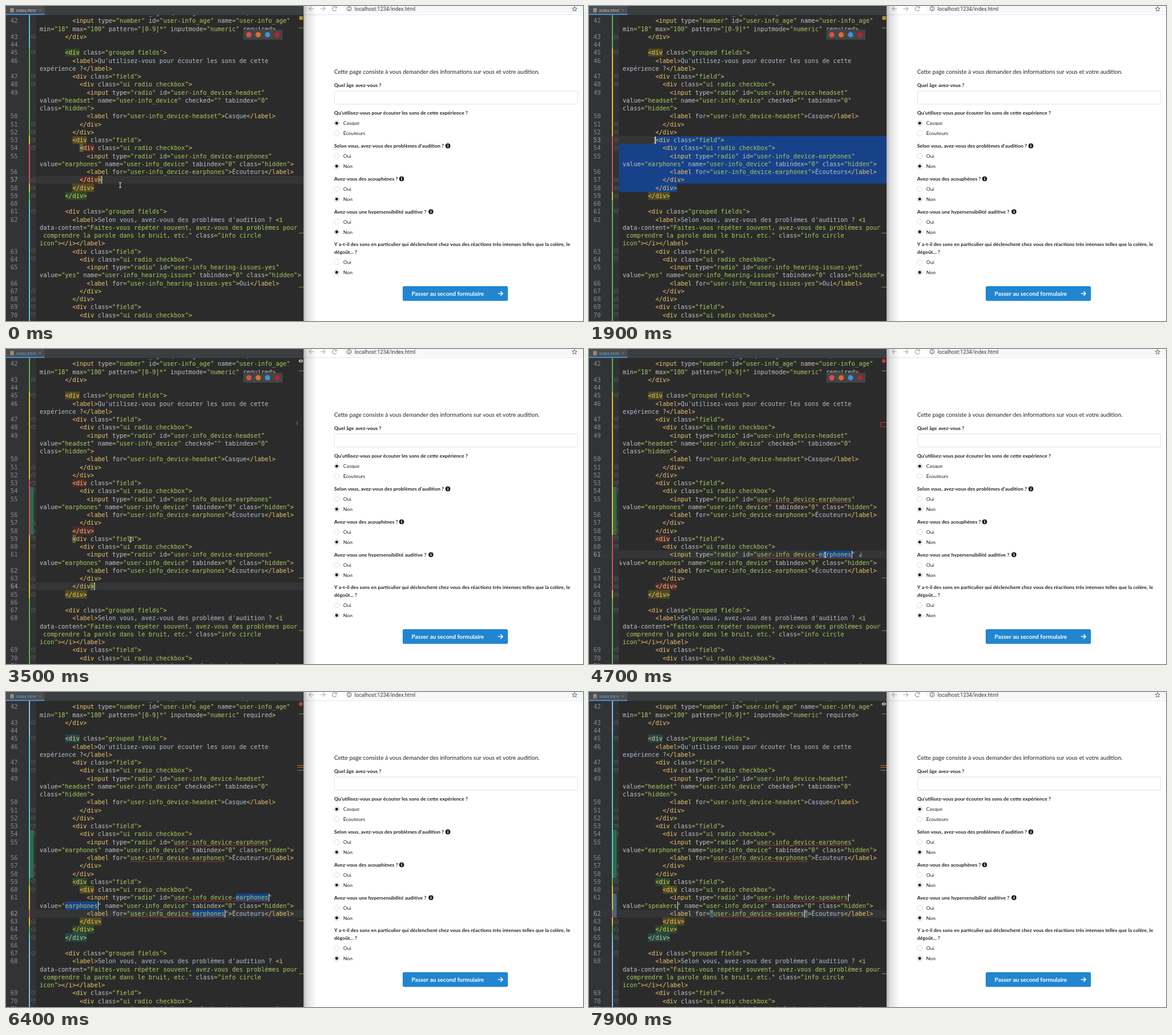
An HTML page with a canvas that plays this animation: 960 px wide and 525 px high, repeating every 8000 ms.

```html
<!DOCTYPE html>
<html lang="fr">
<head>
<meta charset="utf-8">
<title>index.html</title>
<style>
html, body { margin: 0; width: 100%; height: 100%; overflow: hidden; background: #fff; }
canvas { display: block; }
</style>
</head>
<body>
<canvas id="stage" width="960" height="525"></canvas>
<script>
const ctx = document.getElementById('stage').getContext('2d');
const LOOP = 8000;
const CW = 6.04, RH = 13.25, X0 = 50, Y0 = 24.8, EDGE = 495;
const MONO = '10.03px "DejaVu Sans Mono", monospace';
const GOLD = '#efc56c', GREEN = '#abca5f', GREY = '#c2c2c2', PLAIN = '#b0bece';
const BAR = { cyan: '#52c4c4', green: '#55b545', yellow: '#d8bc38', red: '#d0505c', blue: '#86bbea' };
const TINT = { cyan: '#214a4b', green: '#2c4a26', yellow: '#504a20', red: '#502a2c' };

// moments of the session
const T = { press: 600, reached: 1700, release: 2000, dup: 3000, pick: 4400, second: 5200, third: 5600, type: 6700, key: 130 };

// source lines: indent|text, "\n" marks a soft wrap
const radio = w => [
  '10|<div class="field">',
  '12|<div class="ui radio checkbox">',
  `14|<input type="radio" id="user-info_device-${w}"\nvalue="${w}" name="user-info_device" tabindex="0" class="hidden">`,
  `14|<label for="user-info_device-${w}">Écouteurs</label>`,
  '12|</div>',
  '10|</div>'
];
const HEAD = [
  '10|<input type="number" id="user-info_age" name="user-info_age"\nmin="18" max="100" pattern="[0-9]*" inputmode="numeric" required>',
  '8|</div>',
  '0|',
  '8|<div class="grouped fields">',
  '10|<label>Qu\'utilisez-vous pour écouter les sons de cette\nexpérience ?</label>',
  '10|<div class="field">',
  '12|<div class="ui radio checkbox">',
  '14|<input type="radio" id="user-info_device-headset"\nvalue="headset" name="user-info_device" checked="" tabindex="0"\nclass="hidden">',
  '14|<label for="user-info_device-headset">Casque</label>',
  '12|</div>',
  '10|</div>'
];
const TAIL = [
  '8|</div>',
  '0|',
  '8|<div class="grouped fields">',
  '10|<label>Selon vous, avez-vous des problèmes d\'audition ? <i\ndata-content="Faites-vous répéter souvent, avez-vous des problèmes pour\n comprendre la parole dans le bruit, etc." class="info circle\nicon"></i></label>',
  '10|<div class="field">',
  '12|<div class="ui radio checkbox">',
  '14|<input type="radio" id="user-info_hearing-issues-yes"\nvalue="yes" name="user-info_hearing-issues" tabindex="0" class="hidden">',
  '14|<label for="user-info_hearing-issues-yes">Oui</label>',
  '12|</div>',
  '10|</div>',
  '10|<div class="field">',
  '12|<div class="ui radio checkbox">'
];

const colX = c => X0 + c * CW;
const rowY = r => Y0 + r * RH;
const rowTop = r => Math.round(rowY(r) - RH / 2);

function rect(x, y, w, h, color) {
  ctx.fillStyle = color;
  ctx.fillRect(x, y, w, h);
}
// fills n editor rows from row r
function band(x, w, r, color, n = 1) {
  rect(x, rowTop(r), w, rowTop(r + n) - rowTop(r), color);
}
function text(s, x, y, font, color, align = 'left') {
  ctx.font = font;
  ctx.fillStyle = color;
  ctx.textAlign = align;
  ctx.fillText(s, x, y);
}
// one glyph per cell keeps ligatures off the grid
function code(s, col, r, color) {
  const y = Math.round(rowY(r) + 3.5);
  [...s].forEach((ch, i) => ch !== ' ' && text(ch, colX(col + i), y, MONO, color));
}
function disc(x, y, r, fill, stroke) {
  ctx.beginPath();
  ctx.arc(x, y, r, 0, 7);
  if (fill) { ctx.fillStyle = fill; ctx.fill(); }
  if (stroke) { ctx.strokeStyle = stroke; ctx.stroke(); }
}
function path(points, color, width = 1, close = false) {
  ctx.beginPath();
  points.forEach(([x, y]) => ctx.lineTo(x, y));
  if (close) ctx.closePath();
  ctx.strokeStyle = color;
  ctx.lineWidth = width;
  ctx.stroke();
  ctx.lineWidth = 1;
}

// ---- code model ----
function layout(lines) {
  const rows = [];
  lines.forEach((line, i) => {
    const bar = line.indexOf('|');
    let mode = 'text';
    line.slice(bar + 1).split('\n').forEach((part, k) => {
      const row = { col: k ? 1 : +line.slice(0, bar), text: part, num: k ? null : 42 + i, runs: [] };
      if (k && mode === 'name') mode = 'attr';
      let last = null;
      [...part].forEach((ch, c) => {
        let color;
        if (mode === 'str') {
          color = GREEN;
          if (ch === '"') mode = 'attr';
        } else if (mode === 'text') {
          color = ch === '<' ? GOLD : PLAIN;
          if (ch === '<') mode = 'name';
        } else if (ch === '>') {
          color = GOLD;
          mode = 'text';
        } else if (mode === 'name') {
          color = GOLD;
          if (ch === ' ') mode = 'attr';
        } else {
          color = ch === '"' || ch === '=' ? GREEN : GREY;
          if (ch === '"') mode = 'str';
        }
        if (last && last.color === color) last.s += ch;
        else row.runs.push(last = { s: ch, color, col: row.col + c });
      });
      rows.push(row);
    });
  });
  return rows;
}

// ---- pointer ----
const TRACK = [
  [0, 190, 298.5], [250, 190, 298.5], [600, 147, 303], [1200, 139, 250], [1700, 110, 224],
  [2000, 110, 224], [2500, 167, 303.5], [3000, 167, 303.5], [3400, 207, 317.5],
  [3700, 207, 317.5], [4300, 393, 343], [8000, 393, 343]
];
function pointer(t) {
  const i = TRACK.findIndex(p => p[0] > t);
  const a = TRACK[i - 1], b = TRACK[i];
  const k = (t - a[0]) / (b[0] - a[0]), e = k * k * (3 - 2 * k);
  return { x: a[1] + (b[1] - a[1]) * e, y: a[2] + (b[2] - a[2]) * e };
}

// ---- editor state at a time ----
function stateAt(t) {
  const s = { dup: t >= T.dup, word: 'earphones', carets: [], sel: [], line: 20, outer: 'cyan' };
  s.nest = [[4, 22, 'green'], [15, 21, 'yellow'], [16, 20, 'red']];
  if (t < T.press) {
    s.carets = [[20, 18]];
    s.pair = [[16, 12], [20, 17]];
  } else if (t < T.dup) {
    const m = pointer(Math.min(t, T.release));
    const r = Math.round((m.y - Y0) / RH), c = Math.round((m.x - X0) / CW);
    s.carets = [[r, c]];
    s.line = r;
    s.drag = [r, c];
    if (t >= T.reached) {
      s.outer = 'green';
      s.nest = [[4, 22, 'yellow'], [15, 21, 'red']];
    }
  } else if (t < T.pick) {
    s.carets = [[28, 16]];
    s.line = 28;
    s.outer = 'green';
    s.nest = [[4, 29, 'yellow'], [15, 21, 'red']];
    s.pair = [[22, 10], [28, 15]];
  } else {
    const spots = [[24, 55], [25, 8], [26, 43]].slice(0, t < T.second ? 1 : t < T.third ? 2 : 3);
    const n = Math.min(8, Math.floor((t - T.type) / T.key) + 1);
    s.typing = t >= T.type;
    if (s.typing) s.word = 'speakers'.slice(0, n);
    const w = s.word.length;
    s.carets = spots.map(([r, c]) => [r, c + w]);
    if (!s.typing) s.sel = spots.map(([r, c]) => [r, c, c + w]);
    s.line = 23 + spots.length;
    s.outer = 'green';
    s.nest = [[4, 29, 'yellow'], [22, 28, 'red']];
    if (spots.length === 3) {
      s.outer = 'blue';
      s.nest = [[4, 29, 'cyan'], [22, 28, 'green'], [23, 27, 'yellow'], [26, 26, 'red']];
    }
    if (s.typing) s.pair = [[26, 25], [26, 43 + w]];
  }
  s.rows = layout([...HEAD, ...radio('earphones'), ...(s.dup ? radio(s.word) : []), ...TAIL]);
  return s;
}

// ---- editor drawing ----
function foldMark(y, down) {
  const d = down ? 1 : -1, x = 45.5;
  path([[x - 3, y - 3 * d], [x + 3, y - 3 * d], [x + 3, y + d], [x, y + 4 * d], [x - 3, y + d]], '#54575a', 1, true);
  path([[x - 1.5, y], [x + 1.5, y]], '#54575a');
}
function wiggle(r, c, n) {
  rect(colX(c), Math.round(rowY(r) + 5), n * CW, 1, '#8e3a35');
}
function wrapMark(x, y, d) {
  ctx.beginPath();
  ctx.moveTo(x, y - 3.5);
  ctx.quadraticCurveTo(x + 4 * d, y - 1, x - d, y + 3);
  ctx.moveTo(x - d, y);
  ctx.lineTo(x - d, y + 3);
  ctx.lineTo(x + 2 * d, y + 3);
  ctx.strokeStyle = '#b8bcc0';
  ctx.stroke();
}

function drawEditor(t, s) {
  const { rows } = s, SEL = '#17428a';
  rect(0, 0, EDGE, 525, '#2b2b2b');
  rect(0, 0, X0, 525, '#313335');
  band(0, EDGE, s.line, '#343536');

  // nested tag colours
  rect(38, 15, 2, 510, BAR[s.outer]);
  s.nest.forEach(([a, b, c]) => {
    band(38, 2, a, BAR[c], b - a + 1);
    if (a === b) return;
    band(colX(rows[a].col), 4 * CW, a, TINT[c]);
    band(colX(rows[b].col), 6 * CW, b, TINT[c]);
  });
  if (s.dup) band(40, 6, 16, '#2f6b45', 6);
  if (s.typing) band(40, 6, 24, '#40677f', 3);

  if (s.drag) {
    const [r, c] = s.drag;
    for (let i = r; i <= 21; i++) {
      const a = i === r ? colX(c) : X0;
      band(a, Math.max(0, (i === 21 ? colX(16) : EDGE) - a), i, SEL);
    }
  }
  s.sel.forEach(([r, a, b]) => band(colX(a), (b - a) * CW, r, SEL));
  (s.pair || []).forEach(([r, c]) => band(colX(c), CW, r, s.typing ? '#3b5f78' : '#5d6437'));

  code('<label for="user-info_age">Quel âge avez-vous ?</label>', 10, -1, PLAIN);
  rows.forEach((row, r) => {
    const y = rowY(r);
    if (y > 530) return;
    if (row.num) text(row.num, 19.5, Math.round(y + 3.5), MONO, r === s.line ? '#a4a6a7' : '#888c8e', 'right');
    row.runs.forEach(run => code(run.s, run.col, r, run.color));
    if (/^<\/?div/.test(row.text)) foldMark(Math.round(y) - 0.5, row.text[1] !== '/');
  });

  if (t >= 3800) {
    wiggle(17, 38, 26);
    wiggle(24, 38, 17 + s.word.length);
  }
  if (t >= T.third) {
    wiggle(19, 26, 26);
    wiggle(26, 26, 17 + s.word.length);
  }
  const cur = rows[s.line], next = rows[s.line + 1];
  if (cur.num && next && !next.num) {
    wrapMark(colX(cur.col + cur.text.length + 1.5), rowY(s.line), 1);
    wrapMark(53, rowY(s.line + 1), -1);
  }
  s.carets.forEach(([r, c]) => band(Math.round(colX(c)), 1, r, '#d8d8d8'));

  drawStripe(t, s);
  if (t < 5400) drawLaunchers();
  drawTab(s);
}

function drawStripe(t, s) {
  const mark = (y, c, x = 487, w = 8) => rect(x, y, w, 1, c);
  [36, s.dup ? 381 : 378, s.dup ? 469 : 468].forEach(y => mark(y, '#94862a'));
  if (t < T.dup) {
    rect(488, 17, 6, 6, '#a9991f');
  } else if (t < 3800 || s.typing) {
    ctx.beginPath();
    ctx.ellipse(490.5, 20, 3.6, 2.4, 0, 0, 7);
    ctx.fillStyle = '#b4b6b8';
    ctx.fill();
    disc(490.5, 20, 1.2, '#3c3f41');
  } else {
    disc(490.5, 20, 3.2, '#c23c3c');
  }
  if (s.dup && t < 3800) rect(484, 120, 1, 7, '#777');
  if (t >= T.third) {
    [122, 125, 130].forEach(y => mark(y, '#b5702e', 485, 10));
  } else if (t >= 3800) {
    [122, 129].forEach(y => mark(y, '#c03a38', 485, 10));
    rect(485, 122, 1, 7, '#c03a38');
  }
}

function drawLaunchers() {
  rect(395, 39.5, 65, 16.5, '#414547');
  ['#d9503f', '#e5682a', '#3c91d6', '#b8222f'].forEach((c, i) => disc(404 + i * 15.6, 47.8, 4.4, c));
}

function drawTab(s) {
  rect(0, 0, EDGE, 15, '#3c3f41');
  rect(0, 0, 64, 13, '#4a4e50');
  rect(0, 13, 64, 2, '#4a88c7');
  rect(7, 3.5, 6, 7, '#8a9297');
  rect(8, 7, 4, 2.5, '#c57633');
  text('index.html', 17, 9.6, '7.1px Roboto, sans-serif', s.dup ? '#6ba0cf' : '#c4c6c8');
  path([[55, 5.5], [58, 8.5]], '#858a8d', 0.8);
  path([[58, 5.5], [55, 8.5]], '#858a8d', 0.8);
}

// ---- web page ----
const INK = '#212121';
const SMALL = '8.4px Lato, sans-serif', BOLD = 'bold 8.4px Lato, sans-serif';
function option(y, label, on) {
  disc(550.2, y, 4.3, '#fff', on ? '#c4c4c5' : '#dededf');
  if (on) disc(550.2, y, 2.4, '#111');
  text(label, 561, y + 3, SMALL, INK);
}
function infoDot(x, y) {
  disc(x, y, 4.1, '#1b1b1b');
  rect(x - 0.6, y - 0.6, 1.4, 2.8, '#fff');
  rect(x - 0.6, y - 2.4, 1.4, 1.2, '#fff');
}
function question(y, label, icon) {
  text(label, 546, y + 2.8, BOLD, INK);
  if (icon) infoDot(icon, y);
}
function yesNo(y) {
  option(y, 'Oui', false);
  option(y + 17, 'Non', true);
}

function drawPage() {
  rect(EDGE, 0, 465, 525, '#fff');
  rect(EDGE, 14, 465, 1, '#e6e6e6');
  ctx.beginPath();
  ctx.roundRect(561, -7, 430, 19, 9.5);
  ctx.fillStyle = '#f6f7f8';
  ctx.fill();

  const nav = '#b4b6b9';
  path([[512, 4.5], [504.5, 4.5]], nav, 1.1);
  path([[508, 1], [504.5, 4.5], [508, 8]], nav, 1.1);
  path([[523, 4.5], [531, 4.5]], nav, 1.1);
  path([[527.5, 1], [531, 4.5], [527.5, 8]], nav, 1.1);
  ctx.beginPath();
  ctx.arc(546.5, 4.5, 3.7, 0.4, 5.6);
  ctx.strokeStyle = '#85888b';
  ctx.stroke();
  path([[550.2, 0.5], [550.2, 3.2], [547.2, 3.2]], '#85888b');
  disc(571, 4.5, 3.6, null, '#5f6368');
  rect(570.5, 4, 1, 2.6, '#5f6368');
  rect(570.5, 2.2, 1, 1, '#5f6368');
  text('localhost:1234/index.html', 580, 7.6, '8.7px Roboto, sans-serif', '#3a3c3f');
  const star = Array.from({ length: 10 }, (_, i) => {
    const a = i * Math.PI / 5 - Math.PI / 2, r = i % 2 ? 1.8 : 4.3;
    return [946 + r * Math.cos(a), 5 + r * Math.sin(a)];
  });
  path(star, '#5f6368', 0.9, true);

  text('Cette page consiste à vous demander des informations sur vous et votre audition.', 546, 112.8, '9.6px Lato, sans-serif', INK);
  question(132, 'Quel âge avez-vous ?');
  ctx.beginPath();
  ctx.roundRect(546.5, 141.5, 405, 22, 2);
  ctx.strokeStyle = '#e4e4e5';
  ctx.stroke();
  question(178.5, "Qu'utilisez-vous pour écouter les sons de cette expérience ?");
  option(195.3, 'Casque', true);
  option(212, 'Écouteurs', false);
  question(233.2, "Selon vous, avez-vous des problèmes d'audition ?", 735.2);
  yesNo(250);
  question(288, 'Avez-vous des acouphènes ?', 658.2);
  yesNo(304.8);
  question(342.8, 'Avez-vous une hypersensibilité auditive ?', 707);
  yesNo(359.5);
  question(397.5, 'Y a-t-il des sons en particulier qui déclenchent chez vous des réactions très intenses telles que la colère, le');
  question(410.3, 'dégoût... ?');
  yesNo(427);

  ctx.beginPath();
  ctx.roundRect(660, 467, 175, 24.5, 2.5);
  ctx.fillStyle = '#2185d0';
  ctx.fill();
  text('Passer au second formulaire', 735, 482.8, 'bold 9.7px Lato, sans-serif', '#fff', 'center');
  path([[818.5, 479.3], [826, 479.3]], '#fff', 1.4);
  path([[822.8, 475.6], [826.5, 479.3], [822.8, 483]], '#fff', 1.4);

  const shade = ctx.createLinearGradient(EDGE, 0, 517, 0);
  shade.addColorStop(0, 'rgba(0,0,0,.3)');
  shade.addColorStop(0.25, 'rgba(0,0,0,.13)');
  shade.addColorStop(1, 'rgba(0,0,0,0)');
  rect(EDGE, 0, 22, 525, shade);
}

function drawPointer(t) {
  if (t > T.second) return;
  const { x, y } = pointer(t);
  path([[x, y - 4], [x, y + 4]], '#e2e2e2');
  path([[x - 2, y - 4.5], [x, y - 3.7], [x + 2, y - 4.5]], '#e2e2e2');
  path([[x - 2, y + 4.5], [x, y + 3.7], [x + 2, y + 4.5]], '#e2e2e2');
}

function frame(now) {
  const t = now % LOOP;
  drawEditor(t, stateAt(t));
  drawPage();
  drawPointer(t);
  requestAnimationFrame(frame);
}
requestAnimationFrame(frame);
</script>
</body>
</html>
```
